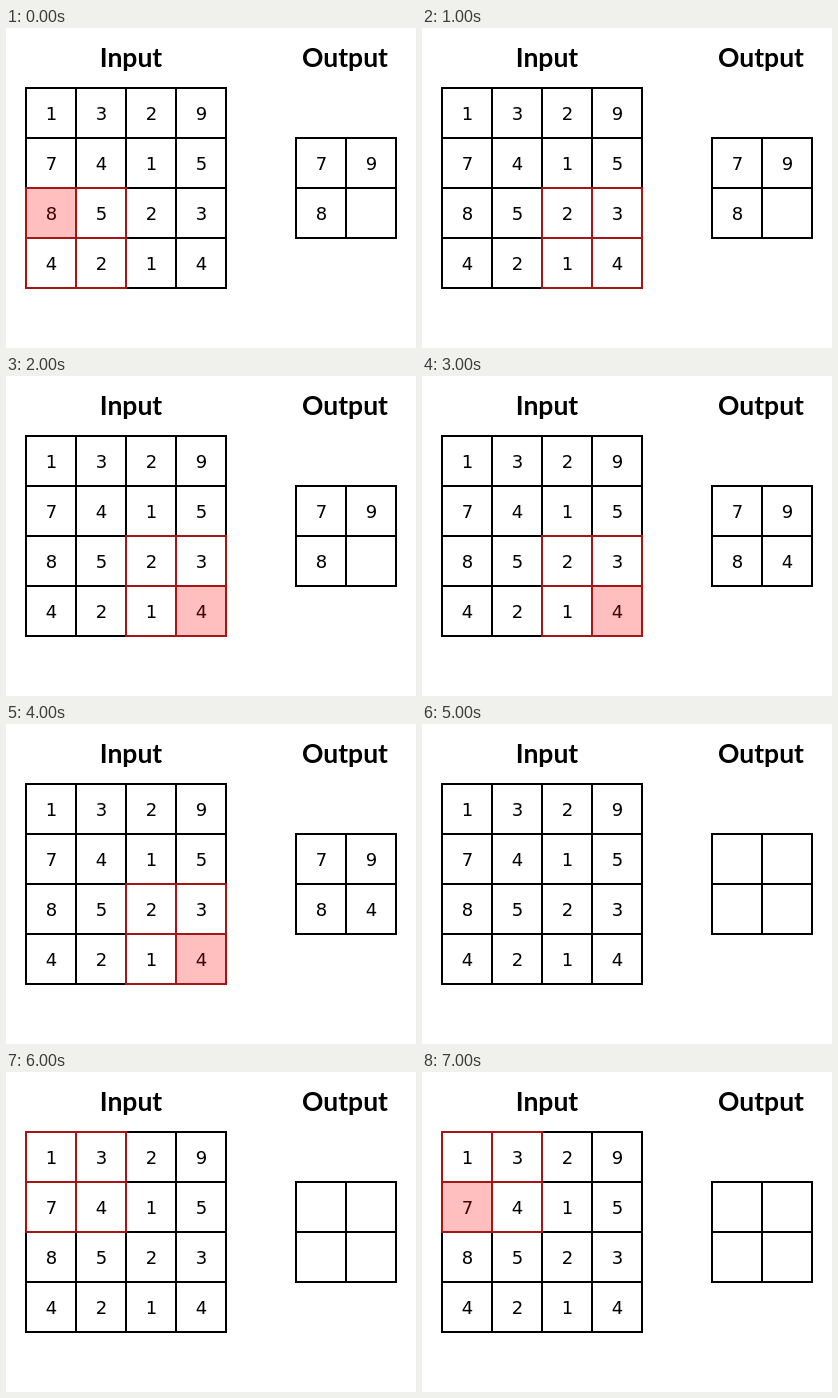
These frames come from a looping animation (410 by 320 pixels, 8000 ms). An HTML page with a canvas:

```html
<!DOCTYPE html>
<html lang="en">
<head>
<meta charset="utf-8">
<title>Max pooling</title>
<style>
  html, body { margin: 0; height: 100%; overflow: hidden; background: #fff; }
  canvas { display: block; }
</style>
</head>
<body>
<canvas width="410" height="320"></canvas>
<script>
const ctx = document.querySelector('canvas').getContext('2d');
const CELL = 50, STEP = 1000;
const input = [[1, 3, 2, 9], [7, 4, 1, 5], [8, 5, 2, 3], [4, 2, 1, 4]];
const pooled = [7, 9, 8, 4];

// win: column and row of the pooling window; max: highlighted cell; shown: filled outputs
const steps = [
  { win: [0, 2], max: [0, 2], shown: 3 },
  { win: [2, 2], shown: 3 },
  { win: [2, 2], max: [3, 3], shown: 3 },
  { win: [2, 2], max: [3, 3], shown: 4 },
  { win: [2, 2], max: [3, 3], shown: 4 },
  { shown: 0 },
  { win: [0, 0], shown: 0 },
  { win: [0, 0], max: [0, 1], shown: 0 },
];

function grid(x, y, n, color) {
  ctx.strokeStyle = color;
  ctx.lineWidth = 2;
  ctx.beginPath();
  for (let i = 0; i <= n; i++) {
    const d = i * CELL, end = n * CELL + 1;
    ctx.moveTo(x + d, y - 1);
    ctx.lineTo(x + d, y + end);
    ctx.moveTo(x - 1, y + d);
    ctx.lineTo(x + end, y + d);
  }
  ctx.stroke();
}

function text(value, x, y, font) {
  ctx.font = font;
  ctx.fillStyle = '#000';
  ctx.textAlign = 'center';
  ctx.fillText(value, x, y);
}

function digit(value, x, y) {
  text(value, x + 25.5, y + 32, '18px "DejaVu Sans", sans-serif');
}

function draw({ win, max, shown }) {
  ctx.fillStyle = '#fff';
  ctx.fillRect(0, 0, 410, 320);
  text('Input', 125, 39, 'bold 26.5px Lato, sans-serif');
  text('Output', 339, 39, 'bold 26.5px Lato, sans-serif');

  input.forEach((row, r) => row.forEach((v, c) => digit(v, 20 + c * CELL, 60 + r * CELL)));
  pooled.slice(0, shown).forEach((v, i) =>
    digit(v, 290 + i % 2 * CELL, 110 + (i >> 1) * CELL));

  if (max) {
    ctx.fillStyle = 'rgba(255, 0, 0, 0.25)';
    ctx.fillRect(20 + max[0] * CELL, 60 + max[1] * CELL, CELL, CELL);
  }
  grid(20, 60, 4, '#000');
  grid(290, 110, 2, '#000');
  if (win) grid(20 + win[0] * CELL, 60 + win[1] * CELL, 2, '#a51616');
}

function frame() {
  draw(steps[Math.floor(performance.now() / STEP) % steps.length]);
  requestAnimationFrame(frame);
}
frame();
</script>
</body>
</html>
```
